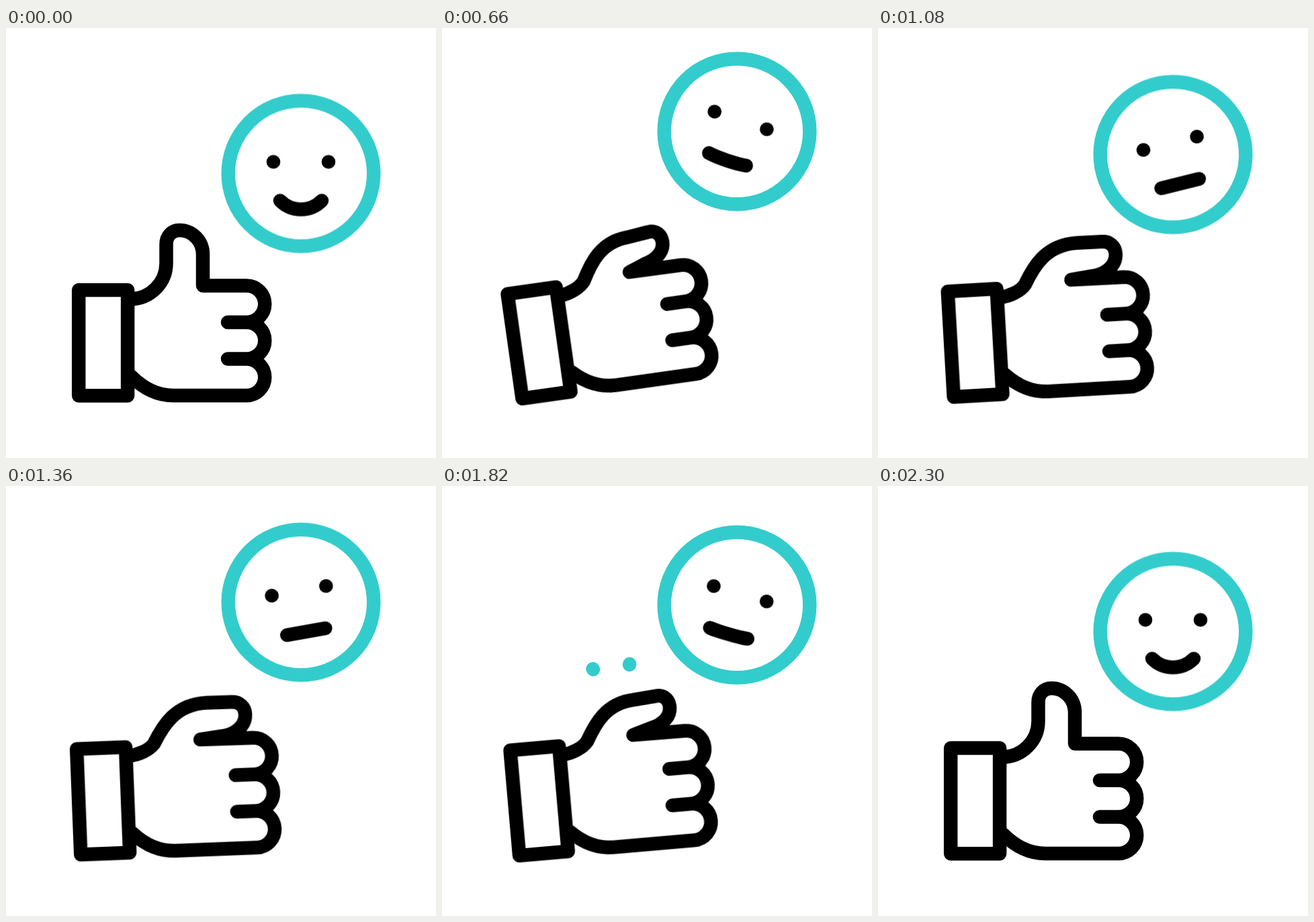
Animation of 640 by 640 pixels, one loop 2400 ms. Source, as an HTML page:

```html
<!DOCTYPE html>
<html lang="en">
<head>
<meta charset="utf-8">
<title>Thumbs up</title>
<style>
  html, body { margin: 0; width: 100%; height: 100%; overflow: hidden; background: #fff; }
  svg { display: block; width: 100%; height: 100%; }

  .line { fill: none; stroke: #000; stroke-width: 20.5; stroke-linecap: round; stroke-linejoin: round; }
  .teal { stroke: #3cc; }

  .anim { animation: 2400ms cubic-bezier(.3333, 0, .6667, 1) infinite; }
  .hand { transform-origin: 144.5px 469px; animation-name: sway; }
  .palm { animation-name: fist; }
  .bob { animation-name: bob; }
  .tilt { animation-name: tilt; }
  .mouth { animation-name: mouth; }
  .spark { stroke-dasharray: 1 3; stroke-dashoffset: 1.01; animation-name: spark; }

  @keyframes sway {
    0%, 8.3333%, 37.5%, 62.5%, 91.6667%, 100% { transform: rotate(0deg); }
    25% { transform: rotate(-9deg); }
    50%, 75% { transform: rotate(-5deg); }
  }

  /* open thumb -> closed fist -> open thumb */
  @keyframes fist {
    0%, 8.3333%, 95.8333%, 100% {
      d: path("M185 403.5 C199.2 403.5 212.8 397.8 222.8 387.8 C232.8 377.8 238.5 364.2 238.5 350 L238.5 322 C238.5 309.5 247 301 258 301 C277.5 301 293 317 293 337 L293 383.5 L358 383.5 A27.2 27.2 0 0 1 358 438 L330 438 M358 438 A27.2 27.2 0 0 1 358 492.5 L330 492.5 M358 492.5 A27.2 27.2 0 0 1 358 547 L249 547 C225 547 203 535 186 518");
    }
    33.3333%, 70.8333% {
      d: path("M185 403.5 C200 402 216 396 223.5 386.5 C238 360 258 329 304 328.7 L342 329 C353 329 361 337 361 348 C361 366 344 378 323 379.5 L292.5 383 L371 383.5 A27.2 27.2 0 0 1 371 438 L343 438 M371 438 A27.2 27.2 0 0 1 371 492.5 L343 492.5 M371 492.5 A27.2 27.2 0 0 1 371 547 L249 547 C225 547 203 535 186 518");
    }
  }

  @keyframes bob {
    0%, 8.3333%, 91.6667%, 100% { transform: translate(439px, 216.5px); }
    25% { transform: translate(439px, 152.5px); }
    45.8333% { transform: translate(439px, 188.5px); }
    66.6667% { transform: translate(439px, 159.5px); }
  }

  @keyframes tilt {
    0%, 8.3333%, 91.6667%, 100% { transform: rotate(0deg); }
    29.1667%, 70.8333% { transform: rotate(19deg); }
    50% { transform: rotate(-19.5deg); }
  }

  @keyframes mouth {
    0%, 8.3333%, 95.8333%, 100% { d: path("M-31 40.5 C-13.7 57.8 13.7 57.8 31 40.5"); }
    33.3333%, 70.8333% { d: path("M-29 44.4 C-14 44.4 14 44.4 29 44.4"); }
  }

  @keyframes spark {
    0%, 75% { stroke-dashoffset: 1.01; }
    83.3333% { stroke-dashoffset: 0; }
    91.6667%, 100% { stroke-dashoffset: -1.01; }
  }
</style>
</head>
<body>
<svg viewBox="0 0 640 640">
  <path class="line teal anim spark" pathLength="1" d="M225 273 L202 235"/>
  <path class="line teal anim spark" pathLength="1" d="M279 266 L283 221"/>

  <g class="anim hand">
    <path class="line anim palm"/>
    <rect class="line" x="108.2" y="390" width="72.9" height="157.3"/>
  </g>

  <g class="anim bob">
    <circle class="line teal" r="108.3"/>
    <g class="anim tilt">
      <circle cx="-41" cy="-17.3" r="10.3"/>
      <circle cx="41" cy="-17.3" r="10.3"/>
      <path class="line anim mouth"/>
    </g>
  </g>
</svg>
</body>
</html>
```
